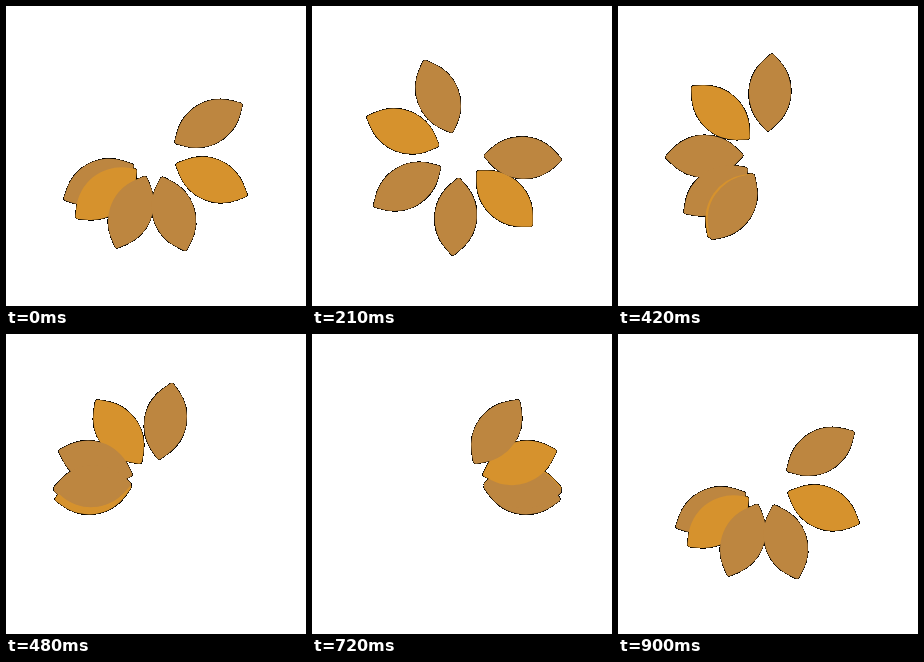
An HTML page for the animation above (0.93 s loop, 300 by 300 pixels).

```html
<!DOCTYPE html>
<html lang="en">
<head>
<meta charset="utf-8">
<title>Petal spinner</title>
<style>
  html, body { margin: 0; width: 100%; height: 100%; overflow: hidden; background: #fff; }
  svg { display: block; width: 100%; height: 100%; }
  .edge { fill: #000; stroke: #000; stroke-width: 1.2; stroke-linejoin: round; shape-rendering: crispEdges; }
  .brown { fill: #bd8640; }
  .amber { fill: #d6922d; }
</style>
</head>
<body>
<svg viewBox="0 0 300 300">
  <defs>
    <path id="petal" d="M-2-100Q0-102 2-100L7.9-94.1A45 45 0 0 1 7.9-30.5L2-24.6Q0-22.6-2-24.6L-7.9-30.5A45 45 0 0 1-7.9-94.1Z"/>
  </defs>
  <g id="edges" transform="translate(148.6 148.6)"></g>
  <g id="fills" transform="translate(148.6 148.6)"></g>
</svg>
<script>
const COUNT = 6, STEP = 30, STEPS = 30;

// Cubic Bezier coordinate with end points 0 and 1
const bez = (a, b, s) => 3 * a * s * (1 - s) ** 2 + 3 * b * s * s * (1 - s) + s ** 3;

function ease(x) {
  let lo = 0, hi = 1;
  for (let i = 0; i < 30; i++) {
    const mid = (lo + hi) / 2;
    if (bez(0.59, 0.41, mid) < x) lo = mid; else hi = mid;
  }
  return bez(0.075, 0.925, lo);
}

function addPetal(groupId, cls) {
  const use = document.createElementNS('http://www.w3.org/2000/svg', 'use');
  use.setAttribute('href', '#petal');
  use.setAttribute('class', cls);
  document.getElementById(groupId).append(use);
  return use;
}

// The first petal lies on top, so build from the last one.
// All edges sit below all fills: only the joint outline shows.
const petals = [];
for (let i = COUNT - 1; i >= 0; i--) {
  const color = i % 3 === 1 ? 'amber' : 'brown';
  petals.push({ i, parts: [addPetal('edges', 'edge'), addPetal('fills', color)] });
}

function draw(now) {
  // One extra step rests on the start pose before the loop repeats
  const step = Math.floor(now / STEP + 0.01) % (STEPS + 1);
  for (const { i, parts } of petals) {
    const phase = (step / STEPS - i / 12 + 1) % 1;
    const angle = 60 * (i + 1) + 360 * ease(phase);
    for (const part of parts) part.setAttribute('transform', `rotate(${angle.toFixed(3)})`);
  }
}

function tick() {
  draw(performance.now());
  requestAnimationFrame(tick);
}
tick();
</script>
</body>
</html>
```
